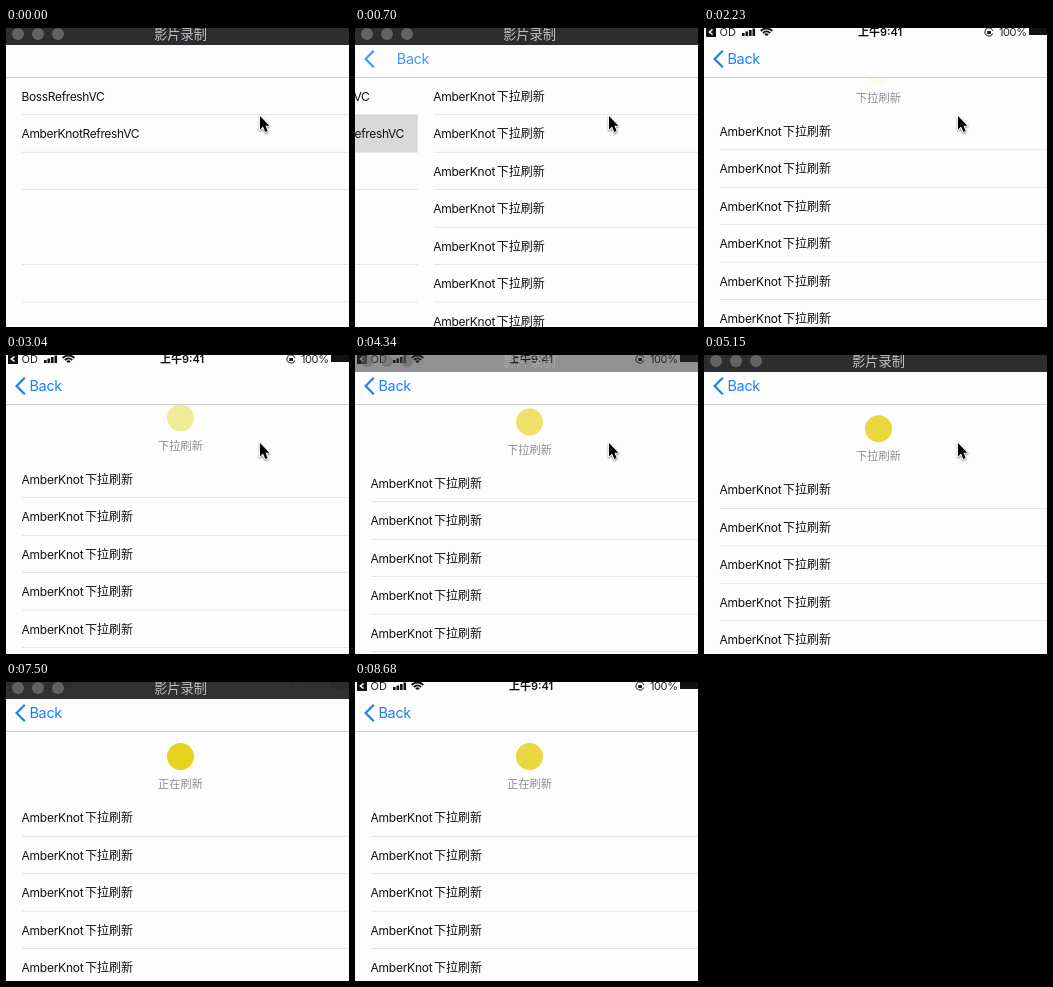
Animation of 343 by 299 pixels, one loop 8.71 s. Source, as an HTML page with a canvas:

```html
<!DOCTYPE html>
<html lang="zh">
<head>
<meta charset="utf-8">
<style>
html, body { margin: 0; width: 100%; height: 100%; overflow: hidden; background: #fdfdfd; }
canvas { display: block; }
</style>
</head>
<body>
<canvas id="stage" width="343" height="299"></canvas>
<script>
const W = 343, H = 299, LOOP = 8710, STEP = 117.3;
const NAV = 49, ROW = 37.45, PAPER = '#fdfdfd', BLUE = '#1a80f8';
const FAMILY = 'Inter, "Noto Sans CJK SC", "Noto Sans", sans-serif';
const CJK = '"Noto Sans CJK SC", "Noto Sans CJK JP", "Noto Sans CJK", sans-serif';
const ctx = document.getElementById('stage').getContext('2d');

// Keyframes as [time, value] pairs
const PULL = [[1400, 0], [1520, 6], [2110, 32], [3040, 56], [3990, 59], [4340, 60],
              [5150, 66.5], [5500, 72], [5860, 67.5]];
const BAR = [[1280, 1], [1500, 0], [4180, 0], [4490, 1], [7500, 1], [7900, 0], [8690, 0]];
const CURSOR_X = [[6850, 0], [7150, 45], [7450, 95]];
const MARK = [[2000, 0], [3040, 0.45], [4340, 0.65], [5150, 0.85], [5860, 1]];

const clamp = v => Math.max(0, Math.min(1, v));

function at(keys, t) {
  if (t <= keys[0][0]) return keys[0][1];
  for (let i = 1; i < keys.length; i++) {
    const [t0, a] = keys[i - 1], [t1, b] = keys[i];
    if (t <= t1) return a + (b - a) * (t - t0) / (t1 - t0);
  }
  return keys[keys.length - 1][1];
}

function rect(x, y, w, h, color) {
  ctx.fillStyle = color;
  ctx.fillRect(x, y, w, h);
}

function disc(x, y, r, color) {
  ctx.fillStyle = color;
  ctx.beginPath();
  ctx.arc(x, y, r, 0, 7);
  ctx.fill();
}

function text(str, x, y, size, color, { align = 'left', weight = 400, gap = 0, family = FAMILY } = {}) {
  ctx.font = `${weight} ${size}px ${family}`;
  ctx.letterSpacing = gap + 'px';
  ctx.textAlign = align;
  ctx.textBaseline = 'alphabetic';
  ctx.fillStyle = color;
  ctx.fillText(str, x, y + size * 0.36);
}

function line(points, color, width) {
  ctx.strokeStyle = color;
  ctx.lineWidth = width;
  ctx.beginPath();
  points.forEach(([x, y]) => ctx.lineTo(x, y));
  ctx.stroke();
}

// A hairline thinner than a pixel, so it fades between pixel rows
function separator(y) {
  rect(16, y, W, 0.6, '#d6d6d8');
}

function menuPage(t) {
  rect(0, NAV, W, H, PAPER);
  if (t >= 350) rect(0, 87, W, 37, '#d9d9d9');
  ['BossRefreshVC', 'AmberKnotRefreshVC'].forEach((name, i) =>
    text(name, 15.5, 68.5 + i * ROW, 12, '#111', { gap: -0.35 }));
  for (let i = 1; i < 7; i++) if (i !== 4) separator(NAV + i * ROW);
}

function listPage(t) {
  const off = at(PULL, t), busy = t >= 5680;
  rect(0, NAV, W, H, PAPER);
  text(busy ? '正在刷新' : '下拉刷新', 174.5, off + 34.5, 11.2, '#8e8e90', { align: 'center', family: CJK });
  const glow = busy ? 0.75 + 0.25 * Math.cos((t - 5680) / 150) : 1;
  ctx.globalAlpha *= at(MARK, t) * glow;
  disc(174.5, off + 7, 13.5, '#e6d21c');
  ctx.globalAlpha = 1;
  for (let i = 0; i < 7; i++) {
    const y = 68.5 + off + i * ROW;
    text('AmberKnot', 15.5, y, 12, '#111', { gap: -0.25 });
    text('下拉刷新', 79, y, 12, '#111', { family: CJK });
    separator(NAV + off + (i + 1) * ROW);
  }
}

function statusBar() {
  rect(2, -1, 10, 10, '#111');
  line([[8.5, 1.5], [5.5, 4], [8.5, 6.5]], PAPER, 1.6);
  text('OD', 15.5, 4, 11, '#222');
  for (let i = 0; i < 4; i++) rect(38 + i * 3.5, 5 - i * 1.5, 2.6, 3 + i * 1.5, '#111');
  [9, 6, 3].forEach(r => {
    ctx.strokeStyle = '#111';
    ctx.lineWidth = 1.9;
    ctx.beginPath();
    ctx.arc(62.5, 8.5, r - 1, -Math.PI * 0.76, -Math.PI * 0.24);
    ctx.stroke();
  });
  text('上午9:41', 176, 4, 11, '#111', { align: 'center', weight: 600 });
  ctx.lineWidth = 1;
  ctx.beginPath();
  ctx.arc(285, 4, 4, 0.4, 6);
  ctx.stroke();
  rect(283.3, 3, 3.6, 3, '#111');
  text('100%', 295, 4, 11, '#222', { gap: -0.4 });
  rect(325, -1, 18, 8, '#111');
}

function navBar(p) {
  rect(0, 0, W, NAV, PAPER);
  rect(0, NAV, W, 1, '#cfcfd1');
  statusBar();
  ctx.globalAlpha = p;
  line([[18.8, 22.8], [10.6, 31], [18.8, 39.2]], BLUE, 2.2);
  text('Back', 23.5 + 100 * (1 - p), 31, 14.4, BLUE, { gap: -0.3 });
  ctx.globalAlpha = 1;
}

function titleBar(alpha) {
  ctx.globalAlpha = alpha;
  rect(0, 0, W, 17, '#2f2c30');
  [12, 32, 52].forEach(x => disc(x, 6, 6, '#656266'));
  text('影片录制', 174.5, 6, 13.2, '#c2c0c3', { align: 'center', family: CJK });
  ctx.globalAlpha = 1;
}

function cursor(x, y) {
  ctx.save();
  ctx.translate(x, y);
  ctx.scale(0.87, 0.9);
  ctx.beginPath();
  [[0, 0], [0, 15], [3.5, 11.8], [6, 17.8], [8.8, 16.6], [6.3, 10.8], [10.8, 10.8]]
    .forEach(([dx, dy]) => ctx.lineTo(dx, dy));
  ctx.closePath();
  ctx.lineJoin = 'round';
  ctx.strokeStyle = '#fff';
  ctx.lineWidth = 2;
  ctx.shadowColor = 'rgba(0, 0, 0, 0.5)';
  ctx.shadowBlur = 2;
  ctx.shadowOffsetY = 1;
  ctx.stroke();
  ctx.shadowColor = 'transparent';
  ctx.fillStyle = '#000';
  ctx.fill();
  ctx.restore();
}

function draw(now) {
  const t = Math.floor((now % LOOP + 12) / STEP) * STEP;
  const p = 1 - (1 - clamp((t - 440) / 610)) ** 3;
  ctx.globalAlpha = 1;
  rect(0, 0, W, H, PAPER);
  if (p < 1) {
    ctx.save();
    ctx.translate(-W * 0.3 * p, 0);
    menuPage(t);
    ctx.restore();
  }
  if (p > 0) {
    ctx.save();
    ctx.translate(W * (1 - p), 0);
    listPage(t);
    ctx.restore();
  }
  navBar(p);
  titleBar(at(BAR, t));
  cursor(254 + at(CURSOR_X, t), 88);
}

const start = performance.now();
function tick() {
  draw(performance.now() - start);
  requestAnimationFrame(tick);
}
tick();
</script>
</body>
</html>
```
